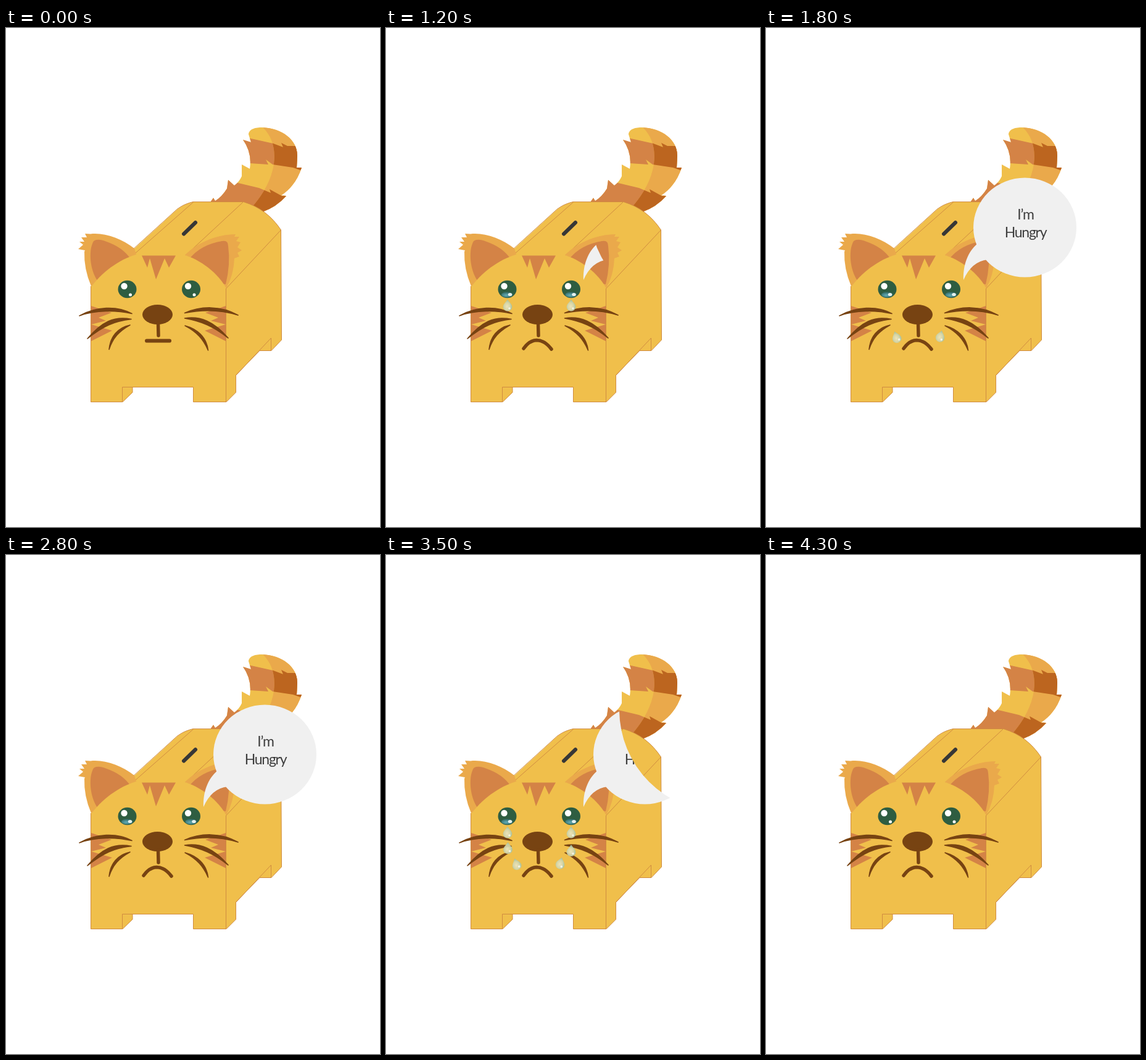
Recreate the animation shown at these times as an HTML page. Size 606x808 px, loop 4.6 s.

```html
<!DOCTYPE html>
<html lang="en">
<head>
<meta charset="utf-8">
<title>Hungry cat box</title>
<style>
  html, body { margin: 0; width: 100%; height: 100%; overflow: hidden; background: #fff; }
  svg { display: block; width: 100%; height: 100%; }
  .body { fill: #f0bf4b; }
  .pale { fill: #eaa94b; }
  .rust { fill: #d48346; }
  .edge { fill: none; stroke: #d08b40; stroke-width: 1; }
  .ink { fill: none; stroke: #774312; stroke-linecap: round; stroke-linejoin: round; }
  .whiskers { fill: #774312; stroke-width: 1.6; }
  text { font: 23px Lato, "Noto Sans", sans-serif; letter-spacing: -1.3px; fill: #3d3d3d; text-anchor: middle; }
</style>
</head>
<body>
<svg viewBox="0 0 606 808">
  <defs>
    <clipPath id="tailShape"><path d="M331 282L336 275L339 280Q350 273 358 260L360 246L370 255Q378 249 382 240V221L395 228Q399 202 384 181L397 185L393 172C394 163 405 161 415 161C448 162 473 182 472 208L471 226L479 226Q470 255 446 271L454 272Q438 290 415 298L385 283Z"/></clipPath>
    <clipPath id="tailShade"><path d="M413 158C445 185 444 240 396 293V310H490V150Z"/></clipPath>
    <path id="bands" d="M380 176L397 179L433 187L449 193L446 186L456 191L475 191L482 232L465 226L432 221L421 213L425 221L380 218Z
      M325 290L358 240L370 255L368 249L410 259L429 267L427 261L447 272L465 270L440 305Z"/>
    <radialGradient id="drop" cx=".45" cy=".6" r=".6">
      <stop offset="0" stop-color="#ece6c2"/><stop offset=".55" stop-color="#d3d7ad"/><stop offset="1" stop-color="#8fbcaa"/>
    </radialGradient>
    <radialGradient id="pool" cx=".4" cy=".6" r=".6">
      <stop offset="0" stop-color="#62adb9"/><stop offset="1" stop-color="#2d625a"/>
    </radialGradient>
    <g id="tear">
      <path d="M0 -10C2 -6 7 -3 7.300 2A7.300 7 0 0 1 -7.300 2C-7 -3 -2 -6 0 -10Z" fill="url(#drop)" opacity=".92"/>
      <circle cx="3" cy="4.500" r="1.800" fill="#fff" opacity=".7"/>
    </g>
    <g id="eye">
      <ellipse rx="15" ry="14.300" fill="#2e5d41"/>
      <circle cx="-5" cy="-5" r="5.200" fill="#fff"/>
      <circle cx="5" cy="9" r="2.500" fill="#fff"/>
    </g>
    <g id="water">
      <ellipse cy="8.800" rx="9.500" ry="4.600" fill="url(#pool)"/>
      <ellipse cx="4.500" cy="8.500" rx="3.300" ry="2.600" fill="#e4f1ef"/>
    </g>
    <path id="cheek" class="rust" d="M138 450L171 461L150 469L162 474L138 480L172 490L138 507Z"/>
    <mask id="wipe" maskUnits="userSpaceOnUse" x="300" y="220" width="220" height="200">
      <path fill="#fff" d="M300 220h220v200h-220z"/>
      <circle id="hole" r="165.500" fill="#000"/>
    </mask>
  </defs>

  <g clip-path="url(#tailShape)">
    <path class="body" d="M320 150h170v160h-170z"/>
    <use href="#bands" class="rust"/>
    <g clip-path="url(#tailShade)">
      <path class="pale" d="M390 150h100v160h-100z"/>
      <use href="#bands" fill="#bc651f"/>
    </g>
  </g>

  <path class="body" d="M137.500 605.500V418L207 358L277 294Q288 285 303 281.500H385Q423 293 445.500 327L446.500 505L430 522H411L372.500 562V590L357 605.500H303.500V581.500H205V590L189 605.500Z"/>
  <path class="edge" d="M206 358L277 293.500Q288 285 303 281.500H385Q423 293 445.500 327L446.500 505L430 522.500H411L372.500 562V590L357 605.500H303.500V581.500H188.500V605.500H137.500V418
    M205 582V590L189 605.500M356.500 605V422L445.500 327M303.500 282L208 366M384 282L288 371M429.500 522V502L373 562"/>

  <path class="pale" d="M138 418Q126 390 127 362L128 360L117 358L125 351L119 346L127 346L122 339L131 339L128 333L137 333.500C160 331 187 341 208 357L212 370Z"/>
  <path class="rust" d="M149 410C136 393 133 360 142 345Q148 340 163 346Q189 355 202 374L170 410Z"/>
  <path class="pale" d="M286 372C306 349 340 334 372 334L370 338L378 338L373 345L380 347L375 355L382 360L375 364L378 370L370 373Q369 400 357 421Z"/>
  <path class="rust" d="M297 374Q315 351 350 345Q360 343 360 353Q364 382 356 415L335 412Z"/>
  <path class="body" d="M138 419C160 390 190 372 214 366H282C308 371 340 392 356 420V440H138Z"/>

  <path d="M288 333.500L307 315" stroke="#373737" stroke-width="6" stroke-linecap="round"/>
  <path class="rust" d="M220 368.500H275L264 388L257 373L243 407L233 373L229 388Z"/>
  <use href="#cheek"/>
  <use href="#cheek" transform="translate(494 0) scale(-1 1)"/>
  <g class="ink whiskers">
    <path d="M119 466C145 451 180 449 204 462.500C180 457 145 456 119 466Z
      M203 471.500C175 466 155 476 132 503C158 482 175 475 203 471.500Z
      M201 481C181 485 169 500 167 520.500C173 502 183 491 201 481Z"/>
    <path d="M289.500 461.500C315 450 348 449 376 465C347 456 317 456 289.500 461.500Z
      M289.500 470C315 466 337 475 360 502C336 483 317 475 289.500 470Z
      M290 482C309 487 325 500 327.500 522C320 504 309 492 290 482Z"/>
  </g>
  <use href="#eye" x="196.500" y="423"/>
  <use href="#eye" x="300" y="423"/>
  <g id="tears"></g>
  <ellipse cx="245.500" cy="464" rx="24.500" ry="16" fill="#774312"/>
  <path class="ink" stroke-width="5.500" d="M246.500 478L247 498"/>
  <path id="flat" class="ink" stroke-width="6" d="M228 506.500H265"/>
  <path id="sad" class="ink" stroke-width="5.500" d="M223 519Q232 506 244 505.500Q257 505.500 268 520"/>
  <g id="pools">
    <use href="#water" x="196.500" y="423"/>
    <use href="#water" x="300" y="423"/>
  </g>

  <g id="bubble" mask="url(#wipe)">
    <path fill="#f0f0f0" d="M320 408C319 384 327 362 343 349L359 375Q333 378 320 408Z"/>
    <ellipse cx="419.500" cy="323" rx="83.500" ry="80.500" fill="#f0f0f0"/>
    <text x="420.500" y="309.500">I’m</text>
    <text x="420.500" y="339">Hungry</text>
  </g>
</svg>
<script>
  const LOOP = 4600;
  const STARTS = [0, 300, 600, 1200, 1300, 1400, 1500, 1800, 2800, 3100, 3400, 3500, 3600, 3700, 4000, 4300];
  const $ = id => document.getElementById(id);
  const show = (el, on) => el.style.display = on ? '' : 'none';

  // Each pair: left x, y, tilt, then right x, y, tilt
  const pairs = [[197, 449.5, 0, 300, 449.5, 0], [197.5, 475, 0, 300, 479, 0], [211.5, 501, -18, 282.5, 499.5, 14]];
  $('tears').innerHTML = pairs.map(([lx, ly, la, rx, ry, ra]) => `<g>
    <use href="#tear" transform="translate(${lx} ${ly}) rotate(${la})"/>
    <use href="#tear" transform="translate(${rx} ${ry}) rotate(${ra})"/></g>`).join('');
  const tears = [...$('tears').children];

  const start = performance.now();

  function draw() {
    const t = (performance.now() - start) % LOOP;
    const step = STARTS.filter(s => s <= t).length - 1;
    const crying = step >= 2 && step <= 14;
    const phase = crying ? (step - 2) % 6 : 0;
    const open = Math.max(0, Math.min(4, step - 2, 13 - step));

    show($('flat'), step === 0);
    show($('sad'), step > 0);
    show($('pools'), crying);
    tears.forEach((tear, i) => show(tear, phase > i && phase <= i + 3));

    // A round cut-out slides away to uncover the bubble
    show($('bubble'), open > 0);
    $('hole').setAttribute('cx', 446.5 + 48.5 * open);
    $('hole').setAttribute('cy', 335.5 - 42.5 * open);
    requestAnimationFrame(draw);
  }
  draw();
</script>
</body>
</html>
```
